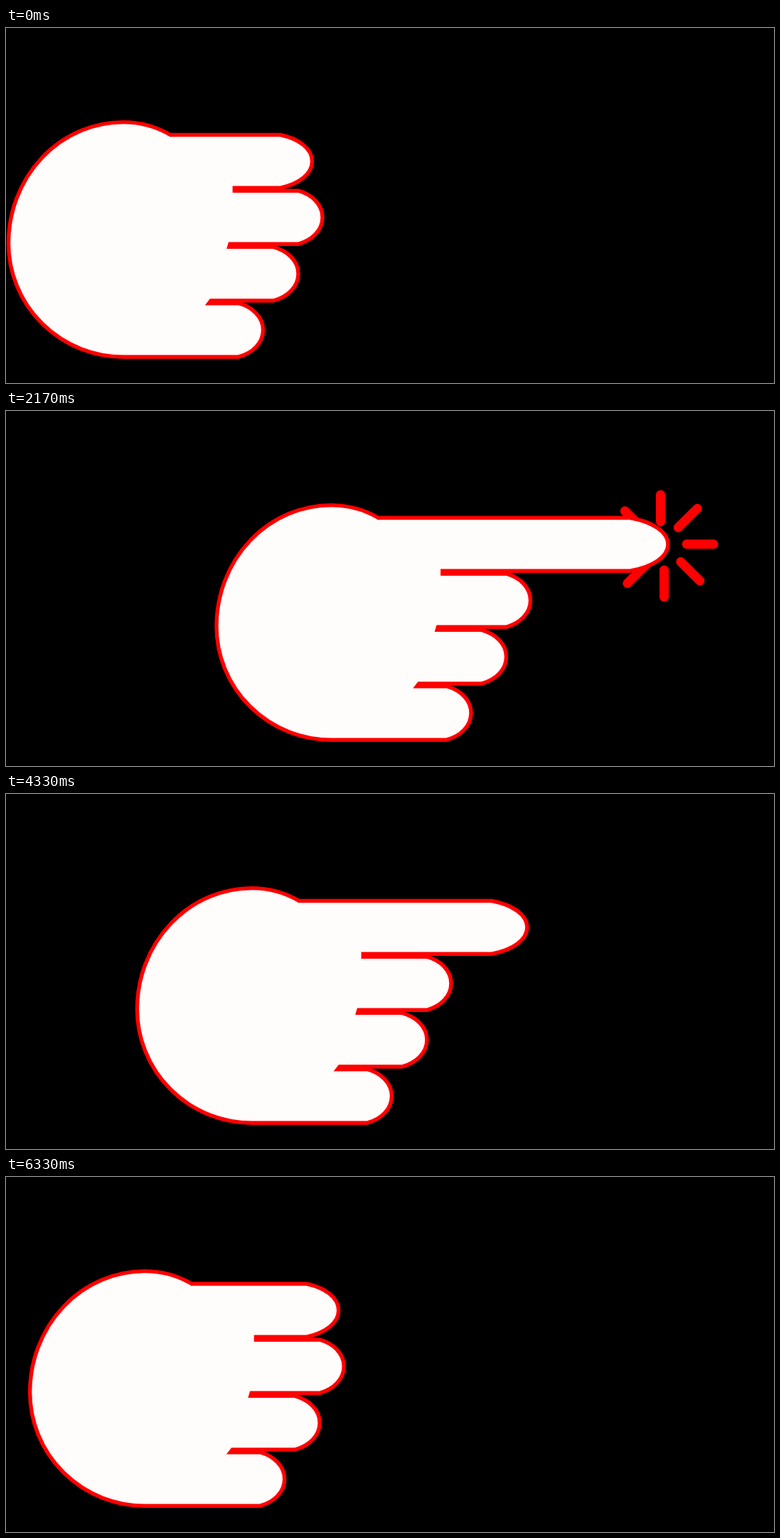
Write an HTML page that moves like this. It is 1080 px wide and 500 px high and loops after 6400 ms.

```html
<!DOCTYPE html>
<html lang="en">
<head>
<meta charset="utf-8">
<title>Pointing hand</title>
<style>
  html, body { margin: 0; width: 100%; height: 100%; overflow: hidden; background: #000; }
  svg { display: block; }
  #hand { fill: #fffdfc; stroke: #f00; stroke-width: 5.4; }
  #burst { stroke: #f00; stroke-width: 13; stroke-linecap: round; }
</style>
</head>
<body>
<svg width="1080" height="500" viewBox="0 0 1080 500">
  <g id="burst"></g>
  <path id="hand"/>
</svg>
<script>
const LOOP = 6400, STEPS = 20;
const hand = document.getElementById('hand');
const burst = document.getElementById('burst');

// [step, value] pairs, linear in between
const SLIDE = [[0, 0], [1, 86.7], [2, 178], [3.25, 292.5], [10.3, 292.5], [20, 0]];
const REACH = [[0, 0], [0.47, 0], [5.48, 208], [12.38, 208], [16.14, 7], [20, 7]];
const SPREAD = [[5.46, 0], [9.275, 131.5], [20, 131.5]];
const BURST_ON = 5.46, BURST_OFF = 12.4;

const spikes = Array.from({ length: 8 }, (_, i) => {
  const line = document.createElementNS('http://www.w3.org/2000/svg', 'line');
  line.setAttribute('transform', `translate(923 190) rotate(${i * 45})`);
  line.setAttribute('y1', -2.5);
  line.setAttribute('y2', -2.5);
  return burst.appendChild(line);
});

function sample(table, p) {
  const i = table.findIndex(([at]) => at >= p);
  if (i <= 0) return table[0][1];
  const [a, u] = table[i - 1], [b, v] = table[i];
  return u + (v - u) * (p - a) / (b - a);
}

// Rounded finger from its upper corner round to its lower one
function finger(corner, tip, top, bottom) {
  const mid = (top + bottom) / 2, bend = corner + (tip - corner) * 0.58;
  return `L${corner} ${top}C${bend} ${top + 5.5} ${tip} ${mid - 18} ${tip} ${mid}` +
    `S${bend} ${bottom - 5.5} ${corner} ${bottom}`;
}

function outline(reach) {
  return 'M231 150.5' +
    finger(386 + reach * 0.957, 430.5 + reach, 150.5, 225.2) + 'L321.3 225.2V229.2' +
    finger(411, 445, 229.2, 304.3) + 'L315 304.3L313.8 308.4' +
    finger(376, 411, 308.4, 384) + 'L288.2 384L285.3 387.7' +
    finger(327, 361.5, 387.7, 463.2) +
    'H165A161.5 160.2 0 0 1 3.5 303A161.5 170.4 0 0 1 165 132.6' +
    'C189 132.6 211 138.6 231 150.5Z';
}

// The motion runs at 12.5 poses a second, shown on a 30 Hz grid
function stepAt(ms) {
  const tick = Math.floor((ms + 3.4) * 0.03);
  return Math.max(0, Math.ceil(tick * 5 / 12) - 1) % STEPS;
}

function draw(ms) {
  const p = stepAt(ms);
  hand.setAttribute('d', outline(sample(REACH, p)));
  hand.setAttribute('transform', `translate(${sample(SLIDE, p)} 0)`);

  const shown = p >= BURST_ON && p < BURST_OFF;
  burst.setAttribute('visibility', shown ? 'visible' : 'hidden');
  const r = sample(SPREAD, p);
  for (const line of spikes) {
    line.setAttribute('x1', r - 19);
    line.setAttribute('x2', r + 19);
  }
}

const start = performance.now();
function tick() {
  draw((performance.now() - start) % LOOP);
  requestAnimationFrame(tick);
}
draw(0);
requestAnimationFrame(tick);
</script>
</body>
</html>
```
